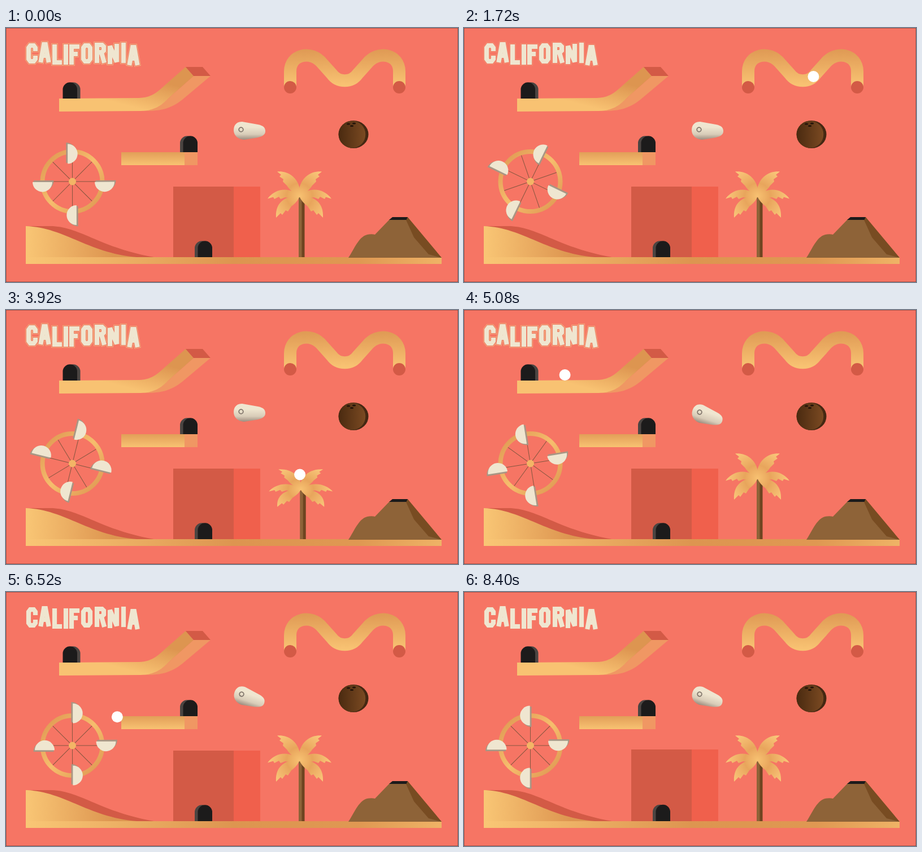
Animation of 800 by 450 pixels, one loop 8440 ms. Source, as an HTML page:

```html
<!DOCTYPE html>
<html lang="en">
<head>
<meta charset="utf-8">
<title>Ball run</title>
<style>
html, body { margin: 0; width: 100%; height: 100%; overflow: hidden; background: #f67564; }
svg { display: block; width: 100vw; height: 100vh; }
</style>
</head>
<body>
<svg viewBox="0 0 800 450">
  <defs>
    <linearGradient id="down" x1="0" y1="0" x2="0" y2="1"><stop stop-color="#e29f58"/><stop offset="1" stop-color="#f8c272"/></linearGradient>
    <linearGradient id="hillFill"><stop stop-color="#f9c675"/><stop offset=".75" stop-color="#dd9550"/></linearGradient>
    <linearGradient id="groundFill"><stop stop-color="#f9c675"/><stop offset=".5" stop-color="#dd9550"/><stop offset=".8" stop-color="#df9852"/><stop offset="1" stop-color="#efb366"/></linearGradient>
    <linearGradient id="tubeFill" gradientUnits="userSpaceOnUse" x1="0" y1="40" x2="0" y2="100"><stop stop-color="#e09b55"/><stop offset="1" stop-color="#f8c272"/></linearGradient>
    <linearGradient id="rampFill" gradientUnits="userSpaceOnUse" x1="262" y1="92" x2="248" y2="146"><stop stop-color="#dd9550"/><stop offset="1" stop-color="#f8c272"/></linearGradient>
    <linearGradient id="ringFill" x1="0" y1="0" x2="1" y2="1"><stop stop-color="#dd9550"/><stop offset=".5" stop-color="#f6bd6d"/><stop offset="1" stop-color="#dd9550"/></linearGradient>
    <linearGradient id="clamFill" x1="0" y1="0" x2="0" y2="1"><stop offset=".3" stop-color="#efe6d0"/><stop offset=".7" stop-color="#d8ccb8"/><stop offset="1" stop-color="#9c8c7e"/></linearGradient>
    <linearGradient id="nutFill"><stop stop-color="#4a2a10"/><stop offset="1" stop-color="#7b4a22"/></linearGradient>
    <radialGradient id="leafFill" gradientUnits="userSpaceOnUse" cx="520" cy="298" r="58"><stop stop-color="#f8c272"/><stop offset=".4" stop-color="#e8a55c"/><stop offset="1" stop-color="#fbc97c"/></radialGradient>
    <g id="leaves" fill="url(#leafFill)">
      <path d="M520 299C524 277 508 252 480 254.500L487 260 484 263 491 268 490 272 497 279C502 287 510 294 520 299Z"/>
      <path d="M520 299C503 280 476 284 463 302.500L473 299.500 475 303 483 299 486 303 494 300C503 302 512 301 520 299Z"/>
      <path d="M520 298C496 296 476 308 478 336L486 328 489 331 495 323 499 325 505 316C512 311 517 305 520 298Z"/>
    </g>
    <g id="door">
      <path d="M0 30V13A12.800 12.800 0 0 1 25.500 13V30Z" fill="#4b4542"/>
      <path d="M5.500 30V13A12.800 12.800 0 0 1 31 13V30Z" fill="#1c1b1b"/>
    </g>
    <g id="gondola">
      <path d="M-18 0H18A18 18 0 0 1-18 0Z" fill="#a89684" transform="translate(2 -2)"/>
      <path d="M-17.500 .8H17.500A17.500 17.500 0 0 1-17.500 .8Z" fill="#efe6d0"/>
    </g>
  </defs>

  <rect width="800" height="450" fill="#f67564"/>
  <g id="sign" role="img" aria-label="CALIFORNIA" fill="none" stroke-linecap="square" stroke-miterlimit="2"></g>

  <path d="M332 85H362L312 127C287 147 265 147 238 147C275 142 284 128 296 117Z" fill="#f09763"/>
  <path d="M94 125L235 124C262 123 272 109 285 98L318 69 332 85 296 117C280 131 271 146 238 147L94 148Z" fill="url(#rampFill)"/>
  <path d="M318 69H348L362 85H332Z" fill="#d35a46"/>

  <path id="tube" d="M696 105V77C696 47 659 38 639 63L622 82C611 97 588 97 577 82L560 63C540 38 503 47 503 77V105" fill="none" stroke="url(#tubeFill)" stroke-width="22"/>
  <g fill="#d35a46"><circle cx="503" cy="105" r="11"/><circle cx="696" cy="105" r="11"/></g>

  <rect x="204" y="220" width="112" height="23" fill="url(#down)"/>
  <rect x="316" y="220" width="23" height="23" fill="#f09763"/>

  <path d="M35 351H78C130 351 165 389 262 406H35Z" fill="#d35a46"/>
  <path d="M35 351C105 353 148 402 240 406.500H35Z" fill="url(#hillFill)"/>
  <rect x="35" y="406" width="736" height="12" fill="url(#groundFill)"/>

  <circle cx="117.500" cy="272" r="53" fill="none" stroke="url(#ringFill)" stroke-width="8"/>
  <g id="wheel"></g>
  <circle cx="117.500" cy="272" r="6.500" fill="#f3b566"/>

  <g id="clam">
    <path d="M403 181C403 170 410 166 418 166L446 171C456 173 459 177 459 183C459 190 452 193 440 195L421 198C410 197 403 190 403 181Z" fill="url(#clamFill)"/>
    <circle cx="416" cy="180" r="3.800" fill="none" stroke="#81766c" stroke-width="1.800"/>
  </g>
  <g id="coconut">
    <ellipse cx="615" cy="188.500" rx="26.500" ry="24.500" fill="#452812"/>
    <ellipse cx="612.500" cy="188.500" rx="23.800" ry="24" fill="url(#nutFill)"/>
    <g fill="#24140a"><ellipse cx="606" cy="170" rx="3" ry="1.500"/><ellipse cx="616" cy="169" rx="3" ry="1.500"/><ellipse cx="612" cy="173.500" rx="3" ry="1.500"/></g>
  </g>

  <g id="palm">
    <path d="M518 300H524V406H518Z" fill="#8e6338"/>
    <path d="M523.500 300H528.500V406H523.500Z" fill="#6e4420"/>
    <use href="#leaves"/><use href="#leaves" transform="matrix(-1 0 0 1 1039 0)"/>
  </g>

  <g id="box">
    <rect x="296" y="281" width="107.500" height="125" fill="#d35a46"/>
    <rect x="403" y="281" width="47" height="125" fill="#f0604c"/>
  </g>

  <circle id="ball" r="10" fill="#fff"/>

  <use href="#door" transform="matrix(-1 0 0 1 131.500 95)"/>
  <use href="#door" x="308" y="190"/>
  <g id="boxDoor"><use href="#door" x="334" y="376"/></g>
  <g id="volcano">
    <path d="M606 407C617 391 625 366.500 643 365.500Q649 365 653 366L679 339H709L771 407Z" fill="#8e6338"/>
    <path d="M711 335L771 407 748 401 722 371 708 340Z" fill="#784c22"/>
    <path d="M684 335H711L708.500 340H678Z" fill="#1c1b1b"/>
  </g>
  <rect x=".25" y=".25" width="799.500" height="449.500" fill="none" stroke="#7c3a32" stroke-width=".6"/>
</svg>
<script>
const LOOP = 8440;
const el = id => document.getElementById(id);
const ball = el('ball'), tube = el('tube'), tubeLength = tube.getTotalLength();

const glyphs = {
  C: 'M16 10V8L13 4H7L4 8V28L7 32H13L16 28V26',
  A: 'M4 32L9 4H12L17 32M8 24H13',
  L: 'M4 4V32H13',
  I: 'M4 4V32',
  F: 'M4 32V4H14M4 17H11',
  O: 'M4 8L7 4H13L16 8V28L13 32H7L4 28Z',
  R: 'M4 32V4H13L16 7V14L13 17H4M12 18L16 32',
  N: 'M4 32V4L16 32V4'
};
const letters = [['C', 36, 27], ['A', 58, 25], ['L', 82, 29], ['I', 102, 29], ['F', 112, 29],
  ['O', 133, 27], ['R', 157, 26], ['N', 180, 28], ['I', 204, 26], ['A', 215, 30]];
const strokeLetters = (color, width) => letters.map(([c, x, y]) =>
  `<path d="${glyphs[c]}" transform="translate(${x} ${y})" stroke="${color}" stroke-width="${width}"/>`).join('');
el('sign').innerHTML =
  `<g id="glow">${strokeLetters('#f5bd86', 11.6)}${strokeLetters('#ec7760', 10.2)}</g>` + strokeLetters('#efe6d0', 8.2);

const spokes = [0, 45, 90, 135].map(a =>
  `<path d="M-49 0H49" transform="rotate(${a})" stroke="#84563f" stroke-width="1"/>`).join('');
const gondolas = [[57, 0, 0], [-53, 0, 0], [-9, -49, -90], [8, 59.5, 90]].map(([x, y, a]) =>
  `<use href="#gondola" transform="translate(${x} ${y}) rotate(${a})"/>`).join('');
el('wheel').innerHTML = spokes + gondolas;

const eases = { lin: u => u, in: u => u * u, out: u => u * (2 - u), sine: u => (1 - Math.cos(Math.PI * u)) / 2 };

// Keys are [time, ...values, easeTowardsThisKey?]
function track(keys, t, fallback = 'lin') {
  const values = key => key.slice(1).filter(v => typeof v === 'number');
  if (t <= keys[0][0]) return values(keys[0]);
  const i = keys.findIndex(k => k[0] > t);
  if (i < 0) return values(keys[keys.length - 1]);
  const a = keys[i - 1], b = keys[i], last = b[b.length - 1];
  const ease = eases[typeof last === 'string' ? last : fallback];
  const u = ease((t - a[0]) / (b[0] - a[0])), to = values(b);
  return values(a).map((v, n) => v + (to[n] - v) * u);
}

const wheelTurn = [[0, 0], [1720, -244], [3080, -377], [3920, -526], [5080, -639], [6520, -810], [8400, -990]];
const volcanoScale = [[0, 1, 1], [620, 1, .86], [720, 1, 1.1], [900, 1, .96], [1150, 1, 1.02], [1720, 1, 1]];
const palmScale = [[2990, 1], [3080, .934], [3920, .816], [4000, 1.05], [4150, .97], [4300, 1]];
const boxScale = [[7840, 1, 1], [7920, .97, 1.03], [8020, 1.31, .78], [8150, .95, 1.06], [8290, 1.02, .985], [8400, 1, 1.016]];
const nutShift = [[4150, 0], [4220, 9], [4320, -2], [4400, 0]];
const clamTurn = [[4430, 0], [4520, 25], [4640, 15], [4760, 18]];
const tubeRun = [[1050, 0], [1720, .434], [1760, .446], [2650, 1, 'in']];

const launch = [[700, 697, 348], [1050, 696, 105, 'out']];
const upperRun = [[3080, 502, 288], [3920, 520, 292, 'sine'], [3990, 525, 258], [4160, 582, 180, 'out'],
  [4440, 436, 160], [4640, 372, 26, 'out'], [4780, 312, 61, 'in'], [4920, 246, 113], [5080, 179, 115], [5230, 116, 115]];
const lowerRun = [[6100, 323, 210], [6485, 205, 211], [6520, 197, 221], [6660, 178, 254], [6800, 150, 240, 'out'],
  [7080, 105, 344, 'in'], [7400, 175, 371, 'in'], [7680, 262, 395], [7900, 350, 396]];

function ballAt(t) {
  if (t < 700) return null;
  if (t < 1050) return track(launch, t);
  if (t < 2650) {
    const p = tube.getPointAtLength(track(tubeRun, t)[0] * tubeLength);
    return [p.x, p.y];
  }
  if (t < 3080) return [503, track([[2650, 105], [3080, 288, 'in']], t)[0]];
  if (t < 5230) return track(upperRun, t);
  if (t >= 6100 && t < 7900) return track(lowerRun, t);
  return null;
}

const place = (id, transform) => el(id).setAttribute('transform', transform);
const scaleAt = (x, y, sx, sy) => `translate(${x} ${y}) scale(${sx} ${sy}) translate(${-x} ${-y})`;

function draw(t) {
  el('glow').setAttribute('opacity', (1 + Math.cos(t * Math.PI / 500)) / 2);
  place('wheel', `translate(117.5 272) rotate(${track(wheelTurn, t)[0]})`);
  place('volcano', scaleAt(688, 407, ...track(volcanoScale, t, 'sine')));

  const squash = track(palmScale, t, 'sine')[0];
  place('palm', `translate(${Math.max(0, 1 - squash) * 12} 0) ${scaleAt(523, 406, 1, squash)}`);
  const boxPose = scaleAt(373, 406, ...track(boxScale, t, 'sine'));
  place('box', boxPose);
  place('boxDoor', boxPose);
  place('coconut', `translate(${track(nutShift, t, 'sine')[0]} 0)`);
  const tilt = track(clamTurn, t, 'sine')[0];
  place('clam', `translate(${tilt / 18} ${tilt / 18}) rotate(${tilt} 416 180)`);

  const spot = ballAt(t);
  ball.setAttribute('visibility', spot ? 'visible' : 'hidden');
  if (spot) place('ball', `translate(${spot[0]} ${spot[1]})`);
}

const start = performance.now();
function tick() {
  draw((performance.now() - start) % LOOP);
  requestAnimationFrame(tick);
}
draw(0);
requestAnimationFrame(tick);
</script>
</body>
</html>
```
